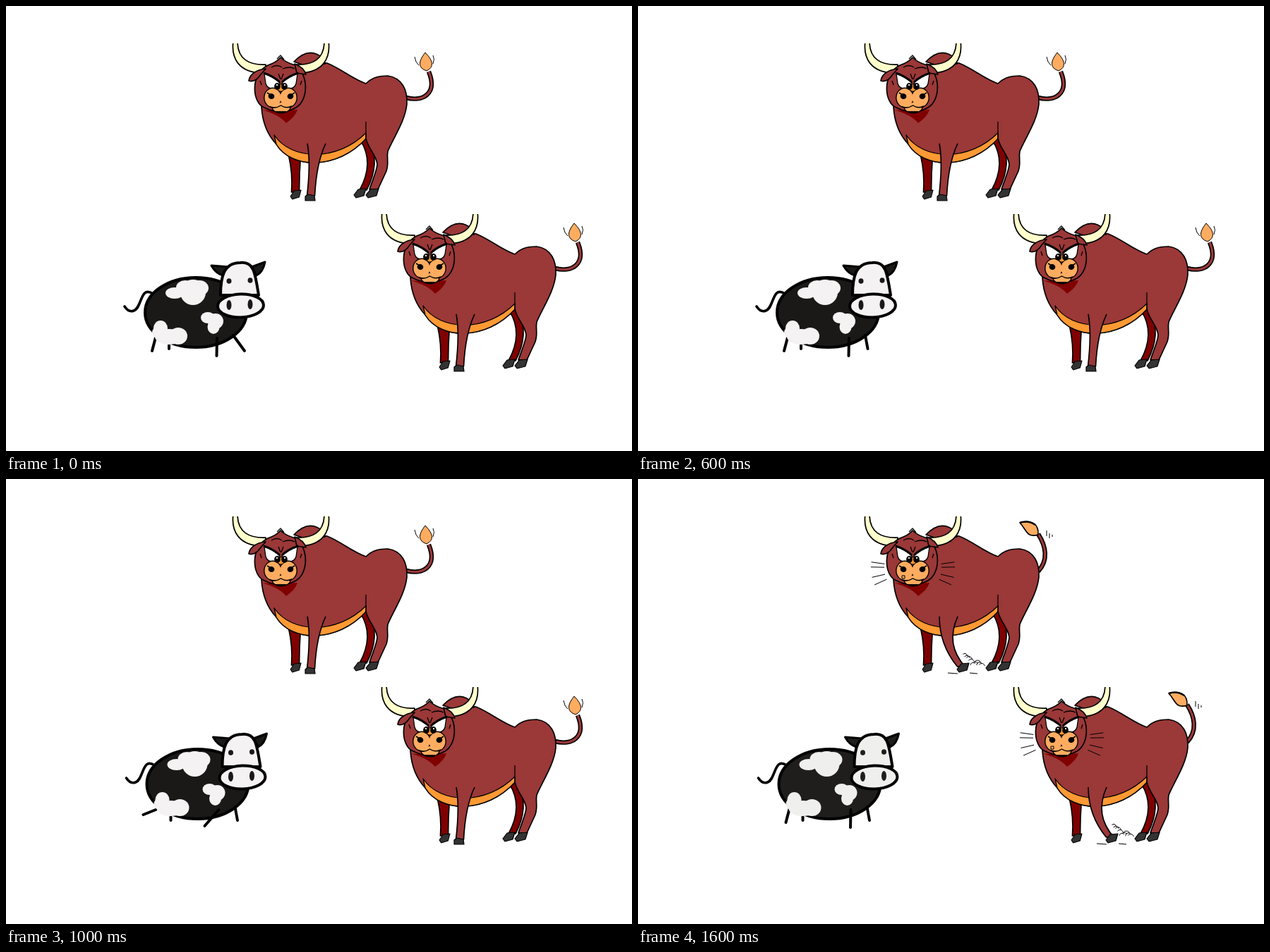
Write an HTML page with a canvas that moves like this. It is 887 px wide and 631 px high and loops after 1800 ms.

```html
<!DOCTYPE html>
<html lang="en">
<head>
<meta charset="utf-8">
<title>Two bulls and a cow</title>
<style>
html, body { margin: 0; width: 100%; height: 100%; overflow: hidden; background: #fff; }
canvas { display: block; }
</style>
</head>
<body>
<canvas id="stage" width="887" height="631"></canvas>
<script>
const ctx = document.getElementById('stage').getContext('2d');
const STEP = 200, STEPS = 9, FACE_X = 389.5;
const HIDE = '#9b3838', DARK = '#800000', BELLY = '#ff9933', SKIN = '#feac60', HORN = '#ffffcc', HOOF = '#333';

function draw(d, fill, width = 1.7) {
  const path = new Path2D(d);
  if (fill) { ctx.fillStyle = fill; ctx.fill(path); }
  if (width) { ctx.lineWidth = width; ctx.strokeStyle = '#000'; ctx.stroke(path); }
}
const line = (d, width = 1) => draw(d, null, width);

function oval(x, y, rx, ry, fill, width = 0, turn = 0) {
  ctx.beginPath();
  ctx.ellipse(x, y, rx, ry, turn, 0, 2 * Math.PI);
  ctx.fillStyle = fill;
  ctx.fill();
  if (width) { ctx.lineWidth = width; ctx.strokeStyle = '#000'; ctx.stroke(); }
}

// Several ovals merged into one outlined shape.
function blob(ovals, fill, width = 0) {
  if (width) for (const o of ovals) oval(...o, '#000', width * 2);
  for (const o of ovals) oval(...o, fill);
}

// Tapered leg: x, y and width at the top, at the bend and at the foot.
function limb([x0, y0, w0], [x1, y1, w1], [x2, y2, w2], fill) {
  draw(`M${x0 - w0 / 2} ${y0}Q${x1 - w1 / 2} ${y1} ${x2 - w2 / 2} ${y2}`
    + `H${x2 + w2 / 2}Q${x1 + w1 / 2} ${y1} ${x0 + w0 / 2} ${y0}`, fill);
}

function hoof(x, y, width = 17) {
  ctx.save();
  ctx.translate(x, y);
  ctx.scale(width / 17, 1);
  draw('M0 2L6 -6L17 -7L14 3L3 6Z', HOOF, 1.2);
  ctx.restore();
}

function bothSides(paintSide) {
  paintSide();
  ctx.save();
  ctx.translate(2 * FACE_X, 0);
  ctx.scale(-1, 1);
  paintSide();
  ctx.restore();
}

function tail(angry) {
  const d = angry ? 'M567 131C582 115 578 95 567 78' : 'M567 130C590 136 612 125 599 93';
  line(d, 6.5);
  ctx.strokeStyle = HIDE;
  ctx.lineWidth = 3.2;
  ctx.stroke(new Path2D(d));
  if (angry) {
    draw('M541 62C556 58 568 62 567 79C550 84 551 72 541 62Z', SKIN);
    line('M541 62Q553 58 563 65', 2.4);
    line('M579 73V81M583 77V84M587 79V82');
  } else {
    draw('M594 66Q612 84 596 92Q578 86 594 66Z', SKIN, 1);
    line('M579 72L581 79L585 84M605 70Q608 75 605 82');
  }
}

function torso() {
  limb([508, 190, 12], [527, 222, 9], [506, 261, 10], DARK);
  hoof(493, 266);
  limb([409, 212, 17], [411, 238, 9], [410, 264, 11], DARK);
  hoof(403, 268, 15);
  draw('M362 143C362 110 420 75 455 81C475 89 490 103 510 110C520 100 531 99 541 99'
    + 'C562 102 569 120 568 139C566 162 549 187 541 206C539 216 543 222 539 234L527 260H515'
    + 'C520 245 526 232 526 224C524 210 514 204 510 188C470 232 405 232 383 196C368 180 363 160 362 143Z', HIDE);
  draw('M510 188C470 232 405 232 383 196L380 183C405 220 470 220 510 180Z', BELLY, 1.3);
  line('M510 164V188', 1.3);
  hoof(510, 266, 18);
}

function dust() {
  let seed = 7;
  const random = () => (seed = seed * 16807 % 2147483647) / 2147483647;
  for (let i = 0; i < 9; i++) {
    const x = 463 + i * 3, y = 251 + random() * 16, turn = 3 + random();
    ctx.beginPath();
    ctx.arc(x, y, 3 + random() * 2, turn, turn + 2.4);
    ctx.lineWidth = 1;
    ctx.strokeStyle = '#000';
    ctx.stroke();
  }
  line('M439 275L453 276M470 275L481 276');
}

function frontLeg(angry) {
  const hip = [440, 195, 26];
  if (angry) {
    limb(hip, [431, 235, 8], [458, 266, 11], HIDE);
    hoof(452, 268);
    dust();
  } else {
    limb(hip, [436, 222, 8], [432, 269, 11], HIDE);
    draw('M424 270L428 267L437 269L438 276H424Z', HOOF, 1.2);
  }
}

function muzzle() {
  blob([[378, 130, 11.5, 13], [400, 130, 11.5, 13], [390, 144, 12, 7]], SKIN, 1.4);
  line('M374 143Q382 146 389.500 141Q397 146 405 142', 1.5);
  line('M382 150H397', 1.8);
  oval(FACE_X, 116, 5, 5, BELLY, 1);
  bothSides(() => {
    oval(384.5, 114, 4.4, 5, '#000');
    oval(384, 112, 1, 1.2, '#fff');
    oval(376, 128, 4.4, 4, '#000', 0, .4);
    line('M370 123L375 126', 1.5);
  });
}

function head(angry) {
  draw('M408 79Q430 56 450 75L452 82L423 84Z', HIDE);
  draw('M361 147Q378 149 413 147Q410 157 397 166Q386 153 361 147Z', DARK, 0);
  bothSides(() => draw('M322 50C319 72 328 96 367 95L368 83C345 84 328 76 328 50Z', HORN));
  draw('M389 73Q383 80 371 84C345 97 349 138 366 144Q390 156 411 144C429 133 429 97 410 84Q396 80 389 73Z', HIDE);
  draw('M368 89C355 90 345 97 344 106Q353 109 361 97Z', HIDE);
  draw('M409 82Q422 87 425 97L412 95Z', HIDE);
  line('M384 75L389 70L394 76M376 87Q384 82 391 87M392 89Q402 85 409 89', 1.3);
  bothSides(() => {
    draw('M366 96Q380 101 388 109L386 116Q371 120 368 110Z', '#fff', 1.3);
    line('M365 95Q378 99 388 108', 3);
    line('M386 96L389 104M360 106L362 112', 1.3);
  });
  muzzle();
  if (!angry) return;
  draw('M374 137h4v4h-4Z', SKIN, 1);
  bothSides(() => {
    for (const angle of [-.14, -.02, .23, .42]) {
      const [dx, dy] = [Math.cos(angle), Math.sin(angle)];
      line(`M${389 - 40 * dx} ${126 + 40 * dy}L${389 - 59 * dx} ${126 + 59 * dy}`);
    }
  });
}

function bull(x, y, angry) {
  ctx.save();
  ctx.translate(x, y);
  ctx.beginPath();
  ctx.rect(300, 53, 330, 230);
  ctx.clip();
  tail(angry);
  torso();
  frontLeg(angry);
  head(angry);
  ctx.restore();
}

function cowLegs(gait) {
  const gallop = gait === 'gallop';
  const leg = (x, y, dx, dy) => line(`M${x} ${y}l${dx} ${dy}`, 4);
  leg(212, 470, ...(gallop ? [-20, 8] : [-5, 19]));
  leg(231, 481, 0, 5);
  leg(299, 471, ...(gallop ? [-20, 23] : [-.5, 25]));
  leg(322, 467, ...(gait === 'reach' ? [16, 22] : [3.5, 19]));
}

function cow(x, y, gait, bright) {
  const white = bright ? '#f4f2f2' : '#efefee';
  const black = bright ? '#1a1918' : '#1f1e1d';
  ctx.save();
  ctx.translate(x, y);
  ctx.lineCap = 'round';
  line('M208 408C190 396 193 428 181 432Q174 435 168 426', 3.6);
  oval(269, 434.5, 72, 49.5, black, 4);
  cowLegs(gait);
  blob([[265, 406, 18, 18], [239, 407, 13, 8], [274, 400, 13, 11], [254, 399, 13, 10]], white);
  blob([[286, 442, 10, 8], [297, 447, 11, 11], [294, 455, 8.5, 10]], white);
  blob([[219, 457, 10, 11], [231, 469, 20, 11], [244, 468, 13, 12], [215, 463, 8, 8]], white);
  draw('M291 368L316 370L307 382Q297 379 291 368Z', black, 3);
  draw('M348 370L367 363Q364 378 355 382Z', black, 3);
  draw('M304 410C304 385 308 364 332 364C352 362 353 380 358 410Z', white, 4);
  oval(332.5, 425, 32.5, 16.5, white, 4, -.03);
  for (const [left, y, ry] of [[316, 390, 3.8], [316, 424, 7]]) {
    oval(left, y, 3.5, ry, black);
    oval(left + 30, y - 1, 3.5, ry, black);
  }
  ctx.restore();
}

function cowPose(step) {
  if (step < 4) return [0, 0, step % 2 ? 'stand' : 'reach'];
  if (step === 4) return [2.5, -9, 'stand'];
  return [2.5, -2, step % 2 ? 'gallop' : 'stand'];
}

function render(time) {
  const step = Math.floor(time / STEP) % STEPS;
  const angry = step > 0 && step % 2 === 0;
  ctx.fillStyle = '#fff';
  ctx.fillRect(0, 0, 887, 631);
  ctx.lineJoin = 'round';
  bull(0, 0, angry);
  bull(211, 242, angry);
  cow(...cowPose(step), !angry);
}

let start;
function tick(now) {
  start ??= now;
  render(now - start);
  requestAnimationFrame(tick);
}
render(0);
requestAnimationFrame(tick);
</script>
</body>
</html>
```
